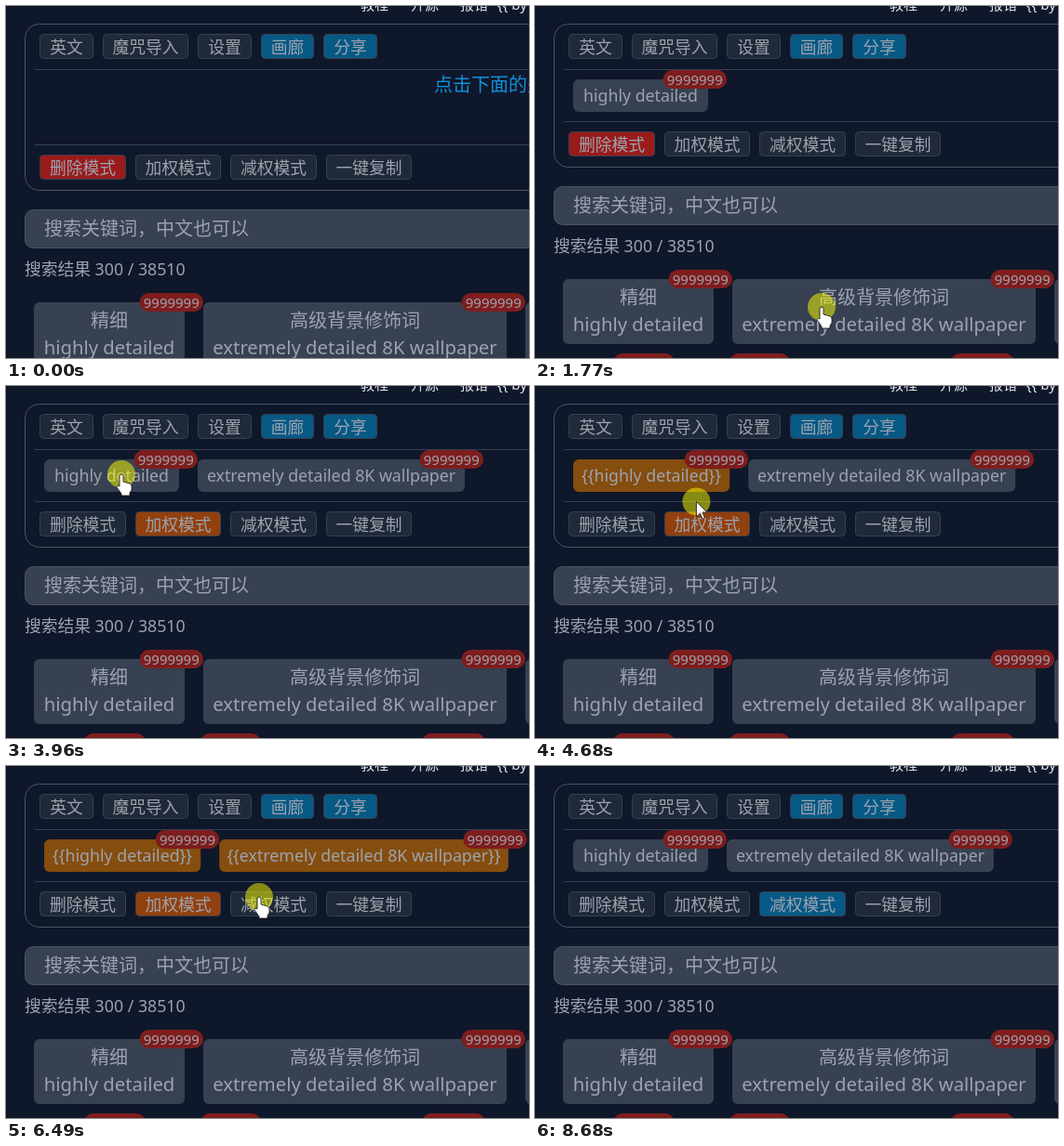
Write an HTML page that moves like this. It is 562x379 px and loops after 8760 ms.

```html
<!DOCTYPE html>
<html lang="zh-CN">
<head>
<meta charset="utf-8">
<style>
  html, body { margin: 0; width: 100%; height: 100%; overflow: hidden; background: #0f172a; }
  svg { display: block; width: 562px; height: 379px; }
  text { font-family: "Noto Sans", "Noto Sans CJK SC", "Noto Sans CJK", sans-serif; fill: #9ca3af; pointer-events: none; }
  #cursor { pointer-events: none; }
</style>
</head>
<body>
<svg>
  <g id="page"></g>
  <g id="cursor">
    <circle r="15" fill="#ff0" fill-opacity=".5"/>
    <path id="shape" fill="#fff" stroke="#111" stroke-width=".8"/>
  </g>
</svg>
<script>
const LOOP = 8760, TICK = 77;
const HAND = 'M-2 2a2 2 0 0 1 4 0V8l7 2q2 1 2 3v4l-2 3v3H0v-2l-5-7q0-3 3-1z';
const ARROW = 'M0 0V16l4-3.5 2.5 6 2.5-1-2.5-6h5z';
const GREY = '#374151', DARK = '#1f2937', BLUE = '#075985';
const LEVEL_FILL = [GREY, '#3f6212', '#854d0e'];
const MODE_FILL = ['#991b1b', '#92400e', BLUE];

// Each chip's weight level (-1 = absent) and the active mode at time t
const levelA = t => t < 1160 ? -1 : t < 4030 ? 0 : t < 4200 ? 1 : t < 7740 ? 2 : t < 7895 ? 1 : 0;
const levelB = t => t < 1847 ? -1 : t < 5760 ? 0 : t < 5910 ? 1 : t < 6870 ? 2 : t < 7100 ? 1 : 0;
const modeAt = t => t < 3330 ? 0 : t < 6560 ? 1 : 2;

// Cursor moves: start, end, target x, y and an optional bend point
const MOVES = [
  [150, 380, 123, 410, 222, 300],
  [610, 990, 123, 350],
  [1160, 1600, 308, 324],
  [1847, 2620, 107, 156, 60, 260],
  [2790, 3100, 164, 154],
  [3330, 3790, 124, 110],
  [3960, 3960, 124, 95],
  [4200, 4270, 133, 110],
  [4600, 5150, 309, 109, 270, 165],
  [5300, 5530, 295, 107],
  [5680, 5680, 286, 92],
  [5910, 6310, 272, 141],
  [6570, 6720, 288, 104],
  [7100, 7430, 170, 98],
  [7590, 7590, 167, 97],
  [7895, 8360, 205, 420]
];

function cursorAt(t) {
  let x = 322, y = 420;
  for (const [t0, t1, tx, ty, bx = (x + tx) / 2, by = (y + ty) / 2] of MOVES) {
    if (t < t0) break;
    const n = Math.round((t1 - t0) / TICK) + 1;
    const u = Math.min(1, (Math.floor((t - t0) / TICK + 0.05) + 1) / n);
    const s = u * u * (3 - 2 * u), r = 1 - s;
    x = r * r * x + 2 * r * s * bx + s * s * tx;
    y = r * r * y + 2 * r * s * by + s * s * ty;
  }
  return [x, y];
}

function rect(x, y, w, h, r, fill, stroke, hot) {
  const d = stroke ? 0.5 : 0;
  return `<rect x="${x + d}" y="${y + d}" width="${w - 2 * d}" height="${h - 2 * d}" rx="${r}" fill="${fill}"` +
    (stroke ? ` stroke="${stroke}"` : '') + (hot ? ' class="hot"' : '') + '/>';
}

function text(s, x, y, size, anchor = 'start', fill = '') {
  return `<text x="${x}" y="${y}" font-size="${size}" text-anchor="${anchor}"` +
    (fill ? ` style="fill:${fill}"` : '') + `>${s}</text>`;
}

const button = (s, x, w, y, fill = DARK) =>
  rect(x, y, w, 27, 4, fill, GREY, true) + text(s, x + w / 2, y + 21, 17.8, 'middle');

const badge = (right, y, s = '9999999', w = 68.5) =>
  rect(right - w, y, w, 20, 10, '#7f1d1d') + text(s, right - w / 2, y + 15.5, 15, 'middle');

function chip(s, x, w, level) {
  return rect(x, 79, w, 35, 6, LEVEL_FILL[level], '', true) +
    text('{'.repeat(level) + s + '}'.repeat(level), x + w / 2, 103, 17.75, 'middle') +
    badge(x + w + 20, 69);
}

function card(title, s, x, w, y) {
  return rect(x, y, w, 70, 6, GREY, '', true) +
    text(title, x + w / 2, y + 27, 20, 'middle') +
    text(s, x + w / 2, y + 56, 20.3, 'middle') +
    badge(x + w + 20, y - 10);
}

function drawPage(a, b, mode) {
  const dy = a < 0 ? 25 : 0;
  const line = y => rect(31, y, 540, 1, 0, GREY);
  const modeButton = (s, x, w, i) => button(s, x, w, 135 + dy, i === mode ? MODE_FILL[i] : DARK);
  const topLink = (s, x) => text(s, x, 4, 15, 'start', '#e5e7eb');

  let out = topLink('教程', 381) + topLink('开源', 435) + topLink('报错', 488) + topLink('{{ by', 528);
  out += rect(20, 19, 600, 155 + dy, 15, 'none', '#4b5563') + line(68) + line(124 + dy);
  out += button('英文', 36, 58, 30) + button('魔咒导入', 104, 92, 30) + button('设置', 206, 58, 30) +
    button('画廊', 274, 57, 30, BLUE) + button('分享', 341, 58, 30, BLUE);
  out += modeButton('删除模式', 36, 93, 0) + modeButton('加权模式', 139, 92, 1) +
    modeButton('减权模式', 241, 93, 2) + modeButton('一键复制', 344, 92, 3);

  if (a < 0) {
    out += text('点击下面的关键词', 460, 92, 20, 'start', '#1190dd');
  } else {
    const w = 145 + 11.6 * a;
    out += chip('highly detailed', 41, w, a);
    if (b >= 0) out += chip('extremely detailed 8K wallpaper', 61 + w, 287 + 11.8 * b, b);
  }

  out += rect(20, 194 + dy, 600, 42, 9, GREY, '#4b5563') +
    text('搜索关键词，中文也可以', 41, 222 + dy, 20) +
    text('搜索结果 300 / 38510', 20, 265 + dy, 17.75);
  out += card('精细', 'highly detailed', 30, 162, 294 + dy) +
    card('高级背景修饰词', 'extremely detailed 8K wallpaper', 212, 326, 294 + dy) +
    rect(558, 294 + dy, 60, 70, 6, GREY);
  return out + badge(150, 374 + dy, '360431', 66) + badge(274, 374 + dy, '864416', 65) +
    badge(515, 374 + dy, '324255', 68);
}

const page = document.getElementById('page');
const cursor = document.getElementById('cursor');
const shape = document.getElementById('shape');
const start = performance.now();
let shown = '';

function frame() {
  const t = (performance.now() - start) % LOOP;
  const state = [levelA(t), levelB(t), modeAt(t)];
  if (state.join() !== shown) {
    shown = state.join();
    page.innerHTML = drawPage(...state);
  }
  const [x, y] = cursorAt(t);
  cursor.setAttribute('transform', `translate(${x} ${y})`);
  const under = document.elementFromPoint(x, y);
  shape.setAttribute('d', under && under.classList.contains('hot') ? HAND : ARROW);
  requestAnimationFrame(frame);
}
frame();
</script>
</body>
</html>
```
